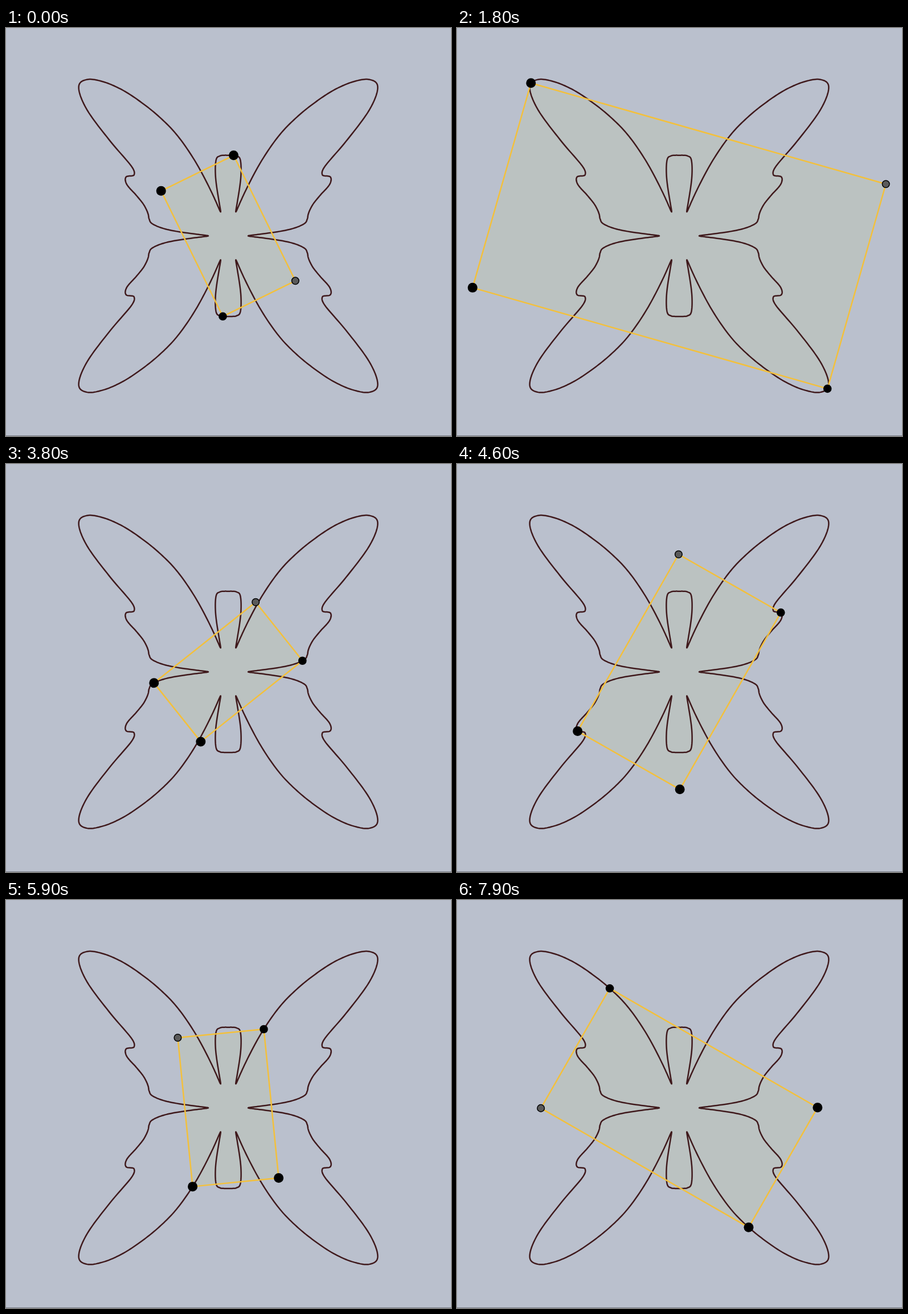
These frames come from a looping animation (781x717 px, 8 s). An HTML page:

```html
<!DOCTYPE html>
<html lang="en">
<head>
<meta charset="utf-8">
<title>Rectangle inscribed in a butterfly curve</title>
<style>
  html, body { margin: 0; width: 100%; height: 100%; overflow: hidden; background: #bac0cd; }
  svg { display: block; width: 100%; height: 100%; }
  #fill { fill: #bbc2c1; }
  #curve { fill: none; stroke: #3f191c; stroke-width: 2.5; stroke-linejoin: round; }
  #edge { fill: none; stroke: #f3c03c; stroke-width: 2.5; stroke-linejoin: round; }
  .free { fill: #5a5a5a; stroke: #000; stroke-width: 1.5; }
</style>
</head>
<body>
<svg viewBox="0 0 781 717">
  <rect y="716" width="781" height="1" fill="#777b85"/>
  <g transform="translate(390 365.3)">
    <polygon id="fill"/>
    <polygon id="curve"/>
    <polygon id="edge"/>
    <circle class="dot" r="7.3"/>
    <circle class="dot free" r="6.3"/>
    <circle class="dot" r="8.5"/>
    <circle class="dot" r="8.5"/>
  </g>
</svg>
<script>
const LOOP = 8000, STEP = 100;

// Radius of the outline every 3 degrees over one quarter turn.
const GRID = 3;
const radii = [
  35, 55, 108, 134.5, 141.8, 145.3, 151.3, 161, 177.5, 200, 207,
  197, 212, 270, 336, 371, 369.8, 348.5, 317.5, 279.5, 241, 200,
  146, 85, 45, 62, 107, 135.5, 141.2, 141.8, 141.6
];

// The outline mirrors at 0 and 90 degrees.
function knot(i) {
  const last = radii.length - 1, k = Math.abs(i) % (2 * last);
  return radii[k > last ? 2 * last - k : k];
}

// Catmull-Rom curve through the radii.
function radius(deg) {
  const i = Math.floor(deg / GRID), t = deg / GRID - i;
  const [a, b, c, d] = [-1, 0, 1, 2].map(k => knot(i + k));
  return b + t / 2 * (c - a + t * (2 * a - 5 * b + 4 * c - d + t * (3 * (b - c) + d - a)));
}

function polar(r, deg) {
  const a = deg * Math.PI / 180;
  return [r * Math.cos(a), r * Math.sin(a)];
}

const $ = id => document.getElementById(id);
const text = list => list.map(p => p.map(v => v.toFixed(2)).join()).join(" ");

const outline = Array.from({ length: 1440 }, (_, i) => polar(radius(i / 4), i / 4));
$("curve").setAttribute("points", text(outline));

// A short rest, then a steady turn.
const heading = ms => ms < 300 ? 93.85 : 94.9 - 0.02722 * ms;

const dots = document.querySelectorAll(".dot");

function draw(now) {
  const ms = Math.floor((now % LOOP) / STEP) * STEP;
  const deg = heading(ms), r = radius(deg);
  // The diagonals cross at 60 degrees.
  const corners = [0, -60, -180, -240].map(turn => polar(r, deg + turn));
  $("fill").setAttribute("points", text(corners));
  $("edge").setAttribute("points", text(corners));
  dots.forEach((dot, i) => {
    dot.setAttribute("cx", corners[i][0].toFixed(2));
    dot.setAttribute("cy", corners[i][1].toFixed(2));
  });
}

const start = performance.now();
function tick() {
  draw(performance.now() - start);
  requestAnimationFrame(tick);
}
tick();
</script>
</body>
</html>
```
